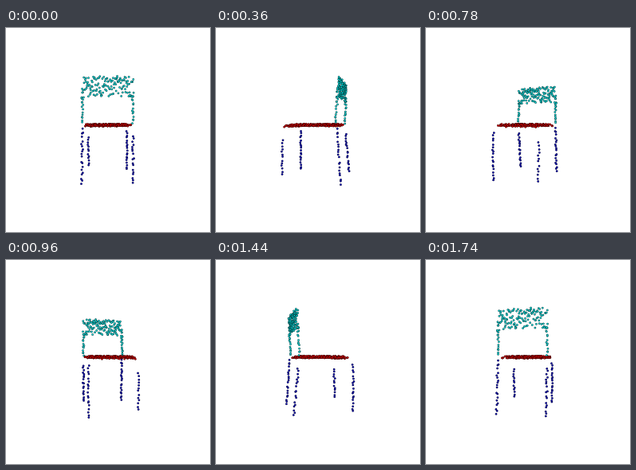
Animation of 256 by 256 pixels, one loop 1.8 s. Source, as a matplotlib script:

```python
import numpy as np
import matplotlib.pyplot as plt
from matplotlib.animation import FuncAnimation

FRAMES, STEP = 30, 60
DPI = 64
CX, CY = 127.5, 121.7      # projection centre in pixels
DIST = 235                 # camera distance
HALF = 27.6                # half width between the legs
CYAN, RED, BLUE = (0, 1, 1), (1, 0, 0), (0, 0, 0.85)

rng = np.random.default_rng(12)


def spread(n, lo, hi):
    """Random values spaced fairly evenly over a range."""
    return lo + (hi - lo) * (np.arange(n) + rng.random(n)) / n


def jitter(n, r):
    return rng.uniform(-r, r, n)


def leg(n, side, front, top, bottom):
    z = spread(n, top, bottom)
    y = np.full(n, -34.6) if front else 30 + 5 * z / -64
    return np.c_[side * HALF + jitter(n, 0.9), y + jitter(n, 0.9), z]


def post(n, side):
    z = spread(n, 1, 32)
    return np.c_[side * HALF + jitter(n, 0.9), 29.3 + z / 20 + jitter(n, 0.8), z]


def panel(n):
    x = rng.permutation(spread(n, -28.5, 28.5))
    edge = np.abs(x) / 28.5
    low = 31.5 - 3 * edge ** 2
    high = 53 - 3 * edge ** 8
    z = low + (high - low) * rng.random(n)
    return np.c_[x, 29.3 + z / 20 + jitter(n, 0.8), z]


def seat(n):
    y = rng.permutation(spread(n, -34, 29))
    x = rng.uniform(-1, 1, n) * (27 - 2 * (y / 34) ** 4)
    z = rng.uniform(-1.4, 1.2, n) - 1.2 * np.clip((-y - 24) / 10, 0, 1)
    return np.c_[x, y, z]


parts = [
    (panel(135), CYAN), (post(13, -1), CYAN), (post(13, 1), CYAN),
    (seat(300), RED),
    (leg(20, -1, False, -3, -64.5), BLUE), (leg(18, 1, False, -10, -63.5), BLUE),
    (leg(13, -1, True, -15, -60), BLUE), (leg(19, 1, True, -8, -65), BLUE),
]
cloud = np.vstack([p for p, _ in parts])
fill = np.vstack([np.tile(c, (len(p), 1)) for p, c in parts])
edge = fill * 0.2

fig = plt.figure(figsize=(256 / DPI, 256 / DPI), dpi=DPI, facecolor="white")
ax = fig.add_axes([0, 0, 1, 1])
ax.set(xlim=(0, 256), ylim=(256, 0))
ax.axis("off")
px = 72 / DPI
dots = ax.scatter(cloud[:, 0], cloud[:, 1], s=(2.1 * px) ** 2, linewidths=0.55 * px)


def draw(i):
    a = 2 * np.pi * i / FRAMES
    x, y, z = cloud.T
    side = x * np.cos(a) + y * np.sin(a)
    depth = y * np.cos(a) - x * np.sin(a)
    scale = 1 / (1 - depth / DIST)
    order = np.argsort(depth)
    dots.set_offsets(np.c_[CX + side * scale, CY - z * scale][order])
    dots.set_facecolor(fill[order])
    dots.set_edgecolor(edge[order])
    return [dots]


anim = FuncAnimation(fig, draw, frames=FRAMES, interval=STEP, repeat=True, repeat_delay=0)
plt.show()
```
